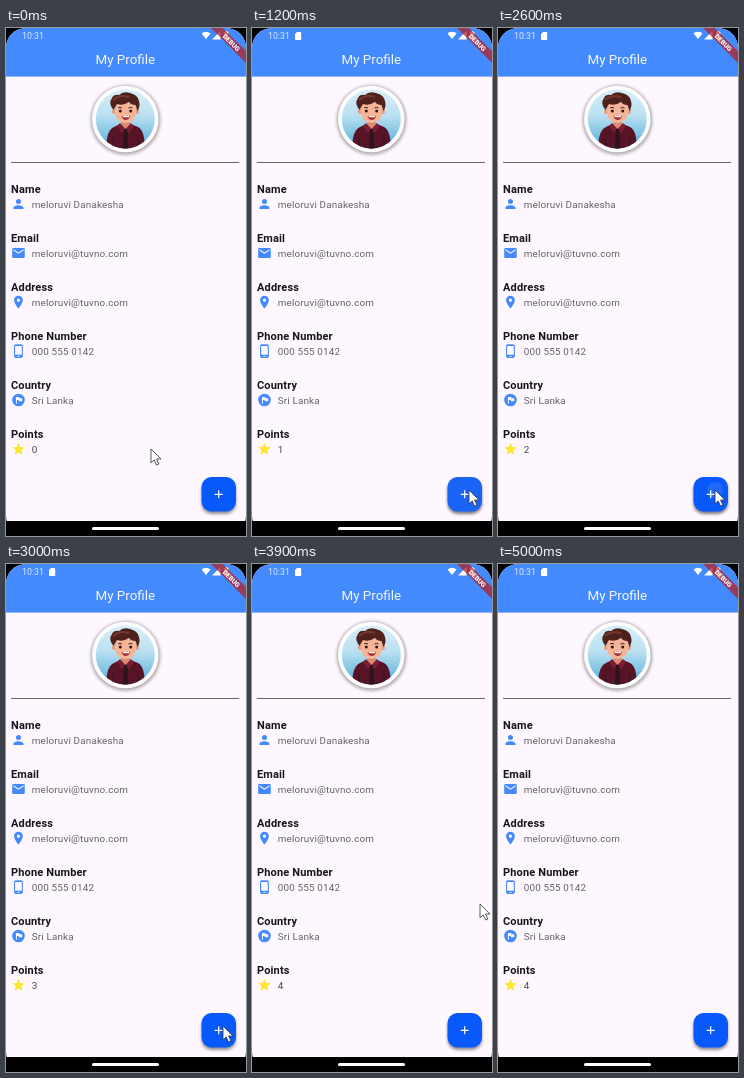
Recreate the animation shown at these times as an HTML page. Size 240 by 508 pixels, loop 5300 ms.

```html
<!DOCTYPE html>
<html lang="en">
<head>
<meta charset="utf-8">
<title>My Profile</title>
<style>
  html, body { margin: 0; width: 100%; height: 100%; overflow: hidden; background: #000; }
  svg { display: block; width: 240px; height: 508px; font-family: Roboto, sans-serif; }
  .label { font-size: 11px; font-weight: 700; letter-spacing: .15px; fill: #17151a; }
  .value { font-size: 9.9px; letter-spacing: .17px; fill: #66616a; }
</style>
</head>
<body>
<svg viewBox="0 0 240 508">
  <defs>
    <clipPath id="screen"><rect width="240" height="508" rx="20"/></clipPath>
    <clipPath id="portrait"><circle cx="119.300" cy="91" r="29.500"/></clipPath>
    <clipPath id="buttonShape"><rect x="195.500" y="449" width="34.500" height="34.500" rx="10"/></clipPath>
    <linearGradient id="sky" x1="0" y1="0" x2="0" y2="1">
      <stop offset="0" stop-color="#d9eff8"/>
      <stop offset=".45" stop-color="#b9e0f1"/>
      <stop offset="1" stop-color="#4ea9d8"/>
    </linearGradient>
    <filter id="soft" x="-30%" y="-30%" width="160%" height="160%"><feGaussianBlur stdDeviation="1.8"/></filter>
  </defs>

  <g clip-path="url(#screen)">
    <rect width="240" height="493" fill="#fef7ff"/>
    <rect width="240" height="48.600" fill="#448aff"/>
    <text x="119.300" y="36" text-anchor="middle" font-size="13.400" fill="#f4f7ff">My Profile</text>

    <!-- status bar -->
    <g fill="#fff">
      <text x="16" y="11" font-size="8.800" fill="#e0eaff">10:31</text>
      <path id="card" d="M45 4h3.500q.7 0 .7.7v6.600q0 .7-.7.7h-4.800q-.7 0-.7-.7V6z"/>
      <path d="M195.500 5.500Q200 1.800 204.500 5.500L200 11z"/>
      <path d="M214.500 3v8.500H206z"/>
      <path d="M218 4h1.200V3h2v1h1.200v8H218z"/>
    </g>
    <g transform="translate(240 0) rotate(45)">
      <rect x="-30" y="16.500" width="60" height="8.200" fill="#b71c1c" fill-opacity=".72"/>
      <text y="23" text-anchor="middle" font-size="6.600" font-weight="900" fill="#fff">DEBUG</text>
    </g>

    <!-- portrait -->
    <circle cx="119.500" cy="92" r="35" fill="#514c48" opacity=".42" filter="url(#soft)"/>
    <circle cx="119.300" cy="91" r="33.300" fill="#fdfdfd"/>
    <g clip-path="url(#portrait)">
      <rect x="88" y="60" width="62" height="62" fill="url(#sky)"/>
      <path d="M100 123Q100 102 108 99L114 96H125L132 99Q139 102 139 123Z" fill="#571426"/>
      <path d="M107 123V110M132 123V110" stroke="#35101c" fill="none"/>
      <path d="M115 91h9v6l-4.500 5-4.500-5z" fill="#d98c70"/>
      <path d="M114 95l5.500 6-3.500 4-5-7zM125 95l-5.500 6 3.500 4 5-7z" fill="#7d1d34"/>
      <path d="M118 101h3l1.500 21h-6z" fill="#2b1420"/>
      <circle cx="108.500" cy="83.500" r="2.500" fill="#e59c7c"/>
      <circle cx="130.500" cy="83.500" r="2.500" fill="#e59c7c"/>
      <path d="M109 75H130V84Q129 95 119.500 95 110 95 109 84Z" fill="#f6b596"/>
      <path d="M107.500 82Q102 75 106 70 108 66 113 67 117 63 124 65 132 67 133 73 134.500 78 131.500 83L129.500 77Q125 77 123 74 117 78 111 76Z" fill="#4f211d"/>
      <path d="M107 72Q114 66 123 69" stroke="#7a382c" stroke-width="2" fill="none"/>
      <path d="M112 80q2.200-1.400 4 0M122.500 80q2.200-1.400 4 0" stroke="#41201a" fill="none"/>
      <circle cx="114.300" cy="83" r="1.500" fill="#2a1715"/>
      <circle cx="124.700" cy="83" r="1.500" fill="#2a1715"/>
      <path d="M115.500 88H124Q123 92 119.700 92 116.500 92 115.500 88Z" fill="#a52f39"/>
      <path d="M116.500 88h6.500v1.300h-6z" fill="#fff"/>
    </g>

    <rect x="5" y="134" width="228" height="1" fill="#6b656d"/>
    <g id="rows"></g>

    <!-- add button -->
    <rect id="shadow" x="195.500" y="451.500" width="34.500" height="34.500" rx="10" filter="url(#soft)"/>
    <g clip-path="url(#buttonShape)">
      <rect x="195" y="449" width="36" height="35" fill="#0759fb"/>
      <circle id="ripple" cx="217" cy="462" fill="#d8d8c8"/>
    </g>
    <path d="M208.700 466.300h8M212.700 462.300v8" stroke="#fff" stroke-width="1.200"/>

    <rect y="493" width="240" height="15" fill="#000"/>
    <rect x="86" y="499" width="67" height="3" rx="1.500" fill="#fff"/>
  </g>
  <path id="cursor" d="M0 0V13.800L3.200 10.900 5.500 16 7.900 15 5.600 10H10Z" fill="#fff" stroke="#333" stroke-width=".8" stroke-linejoin="round"/>
</svg>
<script>
const LOOP = 5300, STEP = 100;
const BLUE = '#448aff';
const byId = id => document.getElementById(id);

const rows = [
  ['Name', 'meloruvi Danakesha', 'M12 12a4 4 0 1 0 0-8 4 4 0 0 0 0 8zm0 2c-2.670 0-8 1.340-8 4v2h16v-2c0-2.660-5.330-4-8-4z'],
  ['Email', 'meloruvi@tuvno.com', 'M20 4H4a2 2 0 0 0-2 2v12a2 2 0 0 0 2 2h16a2 2 0 0 0 2-2V6a2 2 0 0 0-2-2zm0 4-8 5-8-5V6l8 5 8-5z'],
  ['Address', 'meloruvi@tuvno.com', 'M12 2a7 7 0 0 0-7 7c0 5.250 7 13 7 13s7-7.750 7-13a7 7 0 0 0-7-7zm0 9.500a2.500 2.500 0 1 1 0-5 2.500 2.500 0 0 1 0 5z'],
  ['Phone Number', '000 555 0142', 'M16 1H8a3 3 0 0 0-3 3v16a3 3 0 0 0 3 3h8a3 3 0 0 0 3-3V4a3 3 0 0 0-3-3zm-2 20h-4v-1h4zm3.250-3H6.750V4h10.500z'],
  ['Country', 'Sri Lanka', 'M12 2a10 10 0 1 0 0 20 10 10 0 1 0 0-20zm6 12h-5l-1-2H9.500v6H8V7h5l1 2h4z'],
  ['Points', '0', 'M12 17.270 18.180 21l-1.640-7.030L22 9.240l-7.190-.610L12 2 9.190 8.630 2 9.240l5.460 4.730L5.820 21z', '#ffe62e']
];
byId('rows').innerHTML = rows.map(([label, value, icon, color = BLUE], i) => `
  <g transform="translate(0 ${i * 49})">
    <text class="label" x="5" y="164.500">${label}</text>
    <path transform="translate(4.900 168.500) scale(.63)" fill="${color}" fill-rule="evenodd" d="${icon}"/>
    <text class="value" x="25.700" y="179.700">${value}</text>
  </g>`).join('');
const points = byId('rows').lastElementChild.querySelector('.value');
points.style.fill = '#4c484f';

// time, x, y of the pointer tip
const path = [
  [0, 145, 421], [300, 174, 432], [600, 213, 457], [800, 217, 462], [3700, 217, 462],
  [3800, 222, 420], [3900, 228, 340], [4000, 200, 282], [4100, 150, 292], [4200, 134, 335],
  [4300, 153, 381], [4400, 168, 386], [4600, 105, 445], [4800, 24, 482], [4900, 48, 491]
];
// press start and ripple length; the count goes up shortly after the start
const presses = [[1000, 300], [1500, 800], [2600, 300], [3200, 300]];
const COUNT_DELAY = 100;

function pointerAt(t) {
  const i = Math.max(1, path.findIndex(key => key[0] >= t));
  const [t0, x0, y0] = path[i - 1], [t1, x1, y1] = path[i];
  const k = (t - t0) / (t1 - t0);
  return [x0 + (x1 - x0) * k, y0 + (y1 - y0) * k];
}

function render(time) {
  const t = Math.floor(time % LOOP / STEP) * STEP;
  const visible = t < 5000;
  const cursor = byId('cursor');
  cursor.style.display = visible ? '' : 'none';
  if (visible) cursor.setAttribute('transform', `translate(${pointerAt(t)})`);
  byId('card').style.display = t < 100 ? 'none' : '';

  points.textContent = presses.filter(([start]) => t >= start + COUNT_DELAY).length;

  const press = presses.find(([start, length]) => t >= start && t < start + length);
  const p = press ? (t - press[0]) / press[1] : 1;
  const ripple = byId('ripple');
  ripple.setAttribute('r', press ? 8 + Math.min(1, (t - press[0]) / 200) * 26 : 0);
  ripple.setAttribute('opacity', .13 * Math.min(1, (1 - p) * 2));
  byId('shadow').setAttribute('opacity', press ? .5 : .42);
}

function tick(now) {
  render(now);
  requestAnimationFrame(tick);
}
render(0);
requestAnimationFrame(tick);
</script>
</body>
</html>
```
